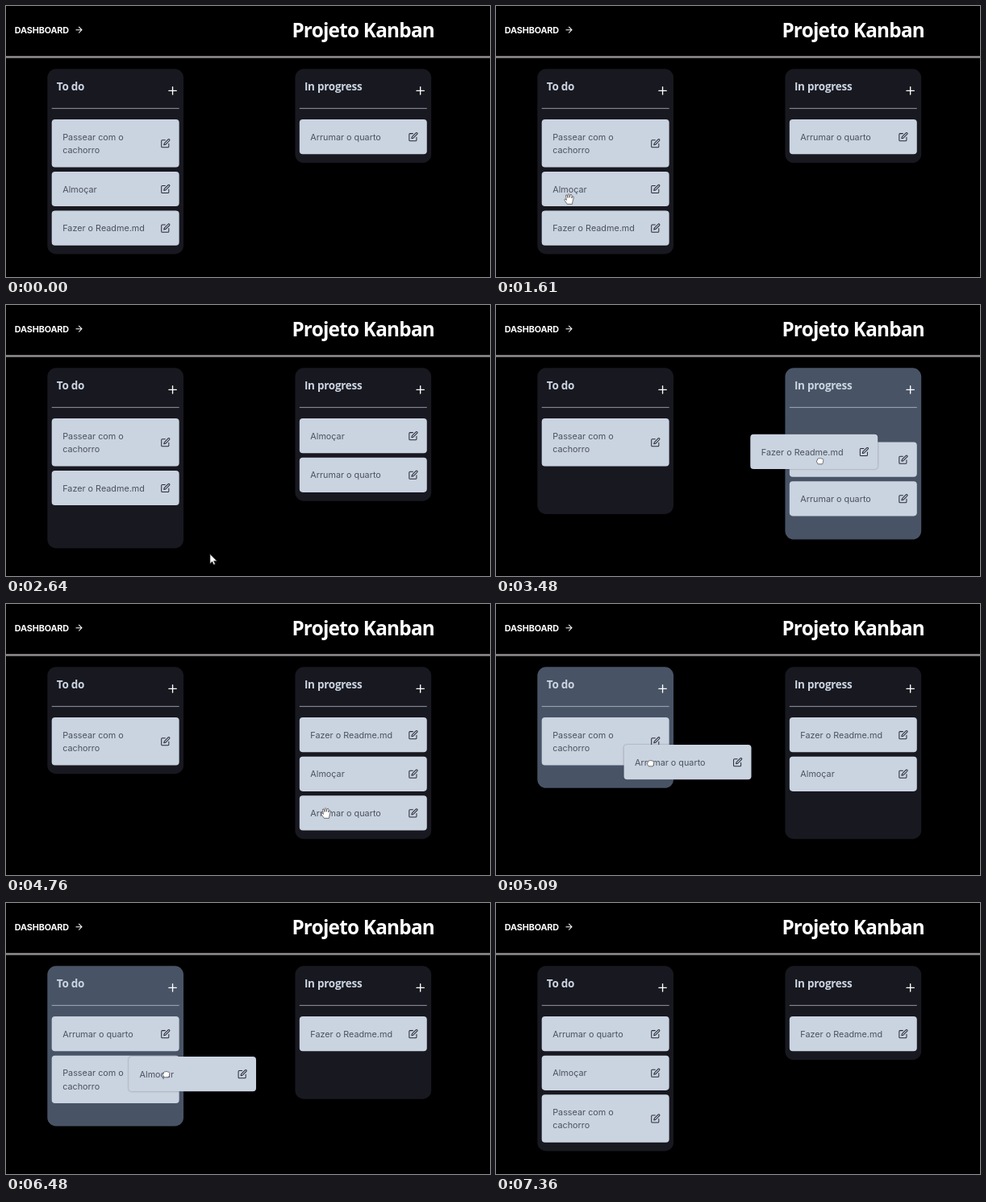
Animation of 600x337 px, one loop 7.61 s. Source, as an HTML page:

```html
<!DOCTYPE html>
<html lang="pt">
<head>
<meta charset="utf-8">
<title>Projeto Kanban</title>
<style>
html, body { margin: 0; width: 100%; height: 100%; overflow: hidden; background: #000; }
#stage { position: relative; width: 600px; height: 337px; overflow: hidden; background: #000; color: #fff; }
#stage * { position: absolute; white-space: nowrap; }
/* The page is laid out at its natural size and shown reduced. */
#board { left: 0; top: 0; width: 889px; height: 500px; transform: scale(.675); transform-origin: 0 0; }
svg { fill: none; stroke: currentColor; stroke-width: 2; stroke-linecap: round; stroke-linejoin: round; overflow: visible; }
.link { left: 16px; top: 32px; font: 700 16px/24px Inter, sans-serif; letter-spacing: -.2px; }
.link + svg { left: 125px; top: 35px; }
h1 { left: 525px; top: 25px; margin: 0; font: 700 36px/40px "Open Sans", "Noto Sans", sans-serif; letter-spacing: -1.13px; }
.rule { left: 0; top: 92px; width: 100%; height: 4px; background: #8c8787; }
.column { top: 116px; width: 250px; border-radius: 16px; background: #181820; }
.column.over { background: #485466; }
h2 { left: 17px; top: 18px; margin: 0; color: #cbd5e1; font: 700 20px/28px "Open Sans", "Noto Sans", sans-serif; letter-spacing: -.4px; }
.column hr { left: 8px; top: 72px; width: 234px; height: 1px; margin: 0; border: 0; background: #cbd5e1; }
.column svg { right: 8px; top: 28px; }
.card { left: 0; top: 0; width: 234px; border-radius: 6px; background: #cad3e0; color: #262b36; }
.card.held { z-index: 2; box-shadow: 0 0 3px #0006; }
.card span { left: 20px; top: 20px; color: #4b5260; font: 400 16px/24px Inter, sans-serif; }
#stage .card span { white-space: pre; }
.card svg { right: 16px; top: calc(50% - 9px); }
</style>
</head>
<body>
<div id="stage">
  <div id="board">
    <div class="link">DASHBOARD</div>
    <svg width="18" height="18" viewBox="0 0 24 24"><path d="M5 12h14M12 5l7 7-7 7"/></svg>
    <h1>Projeto Kanban</h1>
    <div class="rule"></div>
  </div>
  <svg id="cursor" width="16" height="16"><path fill="#fff" stroke="#444" stroke-width=".7"/></svg>
</div>
<script>
const LOOP = 7610, SCALE = .675;
const TOP = 209, GAP = 8, LINE = 24, PAD = 40, COLUMN_TOP = 116, CARD_WIDTH = 234;
const board = document.getElementById('board');
const cursor = document.getElementById('cursor');

function add(className, html) {
  const el = document.createElement('div');
  el.className = className;
  el.innerHTML = html;
  board.append(el);
  return el;
}

const columns = [['To do', 76], ['In progress', 531]].map(([name, x]) => {
  const el = add('column', `<h2>${name}</h2><hr><svg width="24" height="24"><path d="M5 12h14M12 5v14"/></svg>`);
  el.style.left = x + 'px';
  return { el, x: x + 8 };
});

const editIcon = `<svg width="18" height="18" viewBox="0 0 24 24"><path d="M11 4H4a2 2 0 0 0-2 2v14a2 2 0 0 0 2 2h14a2 2 0 0 0 2-2v-7M18.5 2.5a2.12 2.12 0 0 1 3 3L12 15l-4 1 1-4z"/></svg>`;
const cards = ['Passear com o\ncachorro', 'Almoçar', 'Fazer o Readme.md', 'Arrumar o quarto'].map(text => {
  const h = text.split('\n').length * LINE + PAD;
  const el = add('card', `<span>${text}</span>${editIcon}`);
  el.style.height = h + 'px';
  return { el, h, x: 0, y: 0 };
});

// out: leaves its column, over: enters the other one, shift: neighbours make room
const drags = [
  { card: 1, from: 0, to: 1, index: 0, grab: 1680, out: 1870, over: 2010, shift: 2030, drop: 2273, end: 2623 },
  { card: 2, from: 0, to: 1, index: 0, grab: 3200, out: 3250, over: 3310, shift: 3431, drop: 3650, end: 4000 },
  { card: 3, from: 1, to: 0, index: 0, grab: 4790, out: 4930, over: 5060, shift: 5090, drop: 5326, end: 5676 },
  { card: 1, from: 1, to: 0, index: 1, grab: 6190, out: 6330, over: 6450, shift: 6480, drop: 6700, end: 7050 }
];

// Pointer stops on the stage: time, x, y
const path = [
  [30, 262, 262], [400, 330, 215], [790, 470, 150], [1000, 530, 185], [1300, 260, 268],
  [1550, 91, 240], [1680, 91, 240], [2230, 394, 178], [2290, 394, 180], [2640, 253, 310],
  [2740, 235, 317], [3090, 143.4, 238], [3200, 143.4, 238], [3320, 370, 222], [3480, 402, 193],
  [3600, 436, 176], [3660, 436, 178], [3960, 405, 301], [4500, 397, 260], [4790, 397, 260],
  [5270, 98, 168], [5340, 98, 168], [5740, 411, 211], [6190, 411, 211], [6650, 106, 213],
  [6720, 106, 213], [7000, 160, 270], [7340, 215, 350]
];

const shapes = {
  arrow: 'M8 8V19.5L10.7 17 12.5 21 14.3 20.2 12.5 16.3H16.2Z',
  grab: 'M5 14 2 9.5Q1.5 8 3 8L4.5 9.5 3.5 4Q3.5 2.5 5 3L6 6.5V2.5Q6.8 1 7.8 2.3L8.2 6.3 9 2.8Q10.2 1.6 11 3L10.8 7 11.8 5Q13.3 4.2 13.4 5.8L12 11 11.5 14Z',
  grabbing: 'M5 12.5 3.5 10Q3 8.3 4.5 8V6.7Q5 5.3 6.3 6 7.2 5 8 5.8 9.1 5 9.8 6.2 11.6 5.8 11.8 7.5L11.5 10.5 10.7 12.5Z'
};

const clamp = u => Math.max(0, Math.min(1, u));
const mix = (a, b, u) => a + (b - a) * u;

function bezier(x1, y1, x2, y2) {
  const at = (a, b, s) => 3 * a * s * (1 - s) ** 2 + 3 * b * s * s * (1 - s) + s ** 3;
  return u => {
    if (u <= 0 || u >= 1) return clamp(u);
    let lo = 0, hi = 1;
    for (let i = 0; i < 24; i++) {
      const mid = (lo + hi) / 2;
      if (at(x1, x2, mid) < u) lo = mid; else hi = mid;
    }
    return at(y1, y2, lo);
  };
}
const slide = bezier(.2, 0, 0, 1), settle = bezier(.2, 1, .1, 1);
const slid = (t, start) => slide((t - start) / 200);

// Pointer in board units
function pointer(t) {
  const i = path.findIndex(p => p[0] > t);
  if (i < 1) return null;
  const [t0, x0, y0] = path[i - 1], [t1, x1, y1] = path[i];
  const u = (t - t0) / (t1 - t0), e = u * u * (3 - 2 * u);
  return { x: mix(x0, x1, e) / SCALE, y: mix(y0, y1, e) / SCALE };
}

const space = id => cards[id].h + GAP;
const stackTop = (list, n) => list.slice(0, n).reduce((y, id) => y + space(id), TOP);

function render(t) {
  const lists = [[0, 1, 2], [3]];
  const extra = [0, 0];
  let held = null, home = 0;
  for (const d of drags) {
    if (t < d.grab) break;
    const index = lists[d.from].indexOf(d.card);
    home = stackTop(lists[d.from], index);
    lists[d.from].splice(index, 1);
    if (t < d.end) {
      held = { ...d, home: index };
      extra[d.from] = space(d.card);
      extra[d.to] = space(d.card) * slid(t, d.over);
    } else {
      lists[d.to].splice(d.index, 0, d.card);
      extra[d.from] = space(d.card) * (1 - slid(t, d.end));
      extra[d.to] = 0;
    }
  }

  lists.forEach((list, c) => {
    list.forEach((id, i) => {
      let y = stackTop(list, i);
      if (held) {
        const room = space(held.card);
        if (c === held.from && i >= held.home) y += room * (1 - slid(t, held.out));
        if (c === held.to && i >= held.index) y += room * slid(t, held.shift);
      }
      Object.assign(cards[id], { x: columns[c].x, y });
    });
    const bottom = stackTop(list, list.length) + GAP + extra[c];
    columns[c].el.style.height = bottom - COLUMN_TOP + 'px';
    const over = held && (c === held.from ? t < held.out : t >= held.over && t < held.drop);
    columns[c].el.classList.toggle('over', !!over);
  });

  if (held) {
    const a = pointer(held.grab), b = pointer(Math.min(t, held.drop));
    const e = settle((t - held.drop) / (held.end - held.drop));
    const card = cards[held.card];
    card.x = mix(columns[held.from].x + b.x - a.x, columns[held.to].x, e);
    card.y = mix(home + b.y - a.y, stackTop(lists[held.to], held.index), e);
  }
  cards.forEach((card, id) => {
    card.el.style.transform = `translate(${card.x}px, ${card.y}px)`;
    card.el.classList.toggle('held', !!held && held.card === id);
  });

  const p = pointer(t);
  cursor.style.display = p ? '' : 'none';
  if (!p) return;
  const hover = cards.some(k => p.x > k.x && p.x < k.x + CARD_WIDTH && p.y > k.y && p.y < k.y + k.h);
  const kind = held && t < held.drop ? 'grabbing' : hover ? 'grab' : 'arrow';
  cursor.firstElementChild.setAttribute('d', shapes[kind]);
  cursor.style.left = p.x * SCALE - 8 + 'px';
  cursor.style.top = p.y * SCALE - 8 + 'px';
}

const start = performance.now();
function tick() {
  render((performance.now() - start) % LOOP);
  requestAnimationFrame(tick);
}
tick();
</script>
</body>
</html>
```
